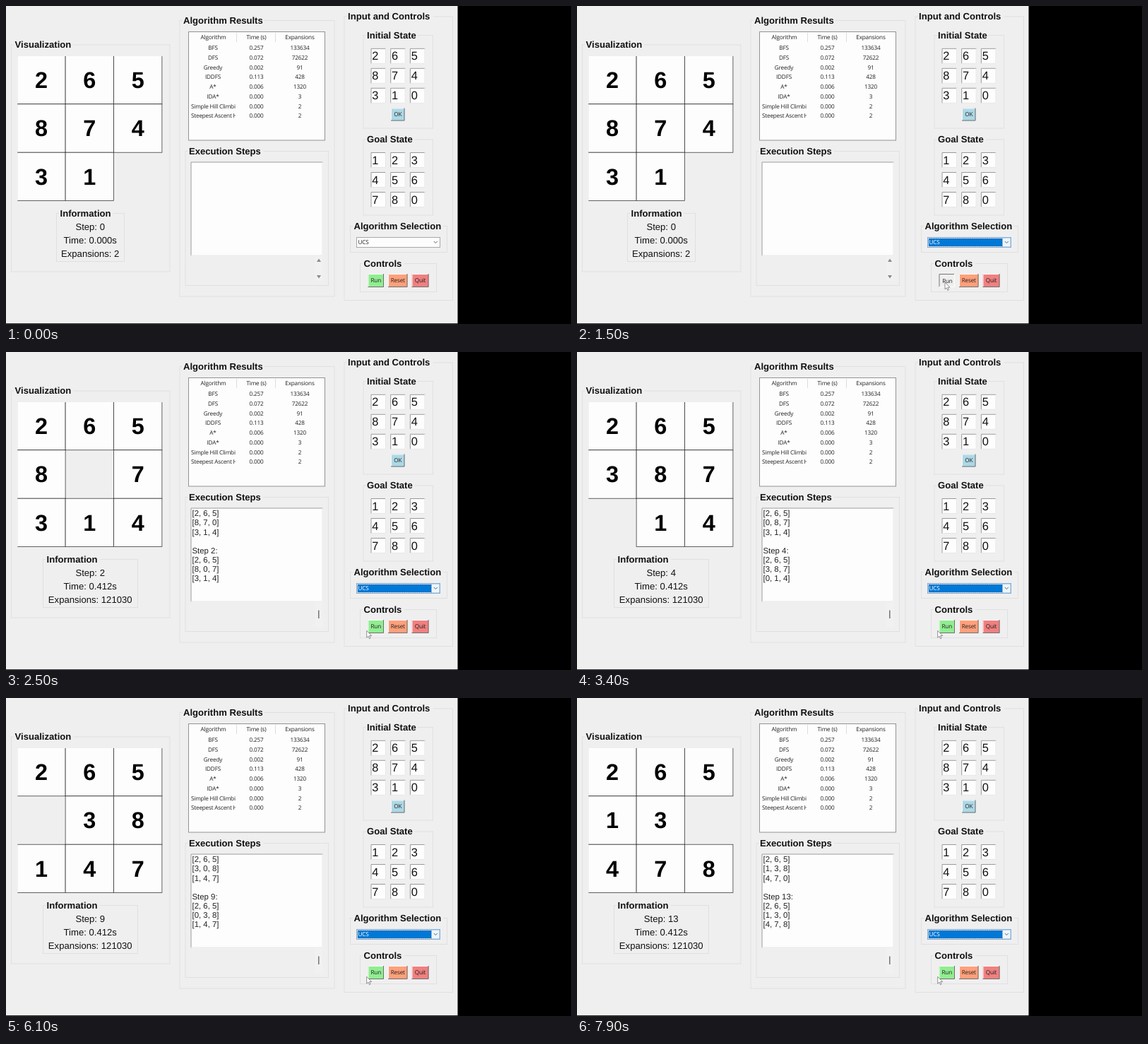
Recreate the animation shown at these times as an HTML page. Size 800 by 450 pixels, loop 8 s.

```html
<!DOCTYPE html>
<html lang="en">
<head>
<meta charset="utf-8">
<title>Puzzle solver</title>
<style>
html, body { margin: 0; width: 100%; height: 100%; overflow: hidden; background: #000; }
svg { display: block; width: 800px; height: 450px; }
text { font-family: "Liberation Sans", Arial, sans-serif; font-size: 13.1px; fill: #111; white-space: pre; text-rendering: geometricPrecision; }
.head { font-weight: bold; }
.tile { font-weight: bold; font-size: 32.4px; fill: #000; }
.entry { font-size: 16.4px; }
.log { font-size: 11.4px; fill: #222; }
.ui { font-family: "Open Sans", "Noto Sans", sans-serif; font-size: 8.2px; letter-spacing: -.2px; fill: #222; }
</style>
</head>
<body>
<svg viewBox="0 0 800 450">
  <defs>
    <clipPath id="board"><rect x="16.3" y="71" width="206" height="206"/></clipPath>
    <clipPath id="names"><rect x="259" y="50" width="66" height="139"/></clipPath>
  </defs>
  <g id="fixed"></g>
  <g id="live"></g>
</svg>
<script>
const LOOP = 8000, FOCUS = 1000, PRESS = 1400, FIRST = 1550, STEP = 510;
const BG = '#f0eff0';
const start = [2, 6, 5, 8, 7, 4, 3, 1, 0];
const goal = [1, 2, 3, 4, 5, 6, 7, 8, 0];
const blankCycle = [8, 5, 4, 3, 6, 7];

const rect = (x, y, w, h, fill, stroke = 'none') =>
  `<rect x="${x}" y="${y}" width="${w}" height="${h}" fill="${fill}" stroke="${stroke}"/>`;
const path = (d, stroke, fill = 'none', width = 1) =>
  `<path d="${d}" stroke="${stroke}" fill="${fill}" stroke-width="${width}"/>`;
const text = (x, y, s, cls = '', anchor = 'start', extra = '') =>
  `<text x="${x}" y="${y}" class="${cls}" text-anchor="${anchor}" ${extra}>${s}</text>`;
const mid = (x, y, s, cls) => text(x, y, s, cls, 'middle');

function group(x, y, x2, y2, title, labelWidth) {
  return rect(x + .5, y + .5, x2 - x, y2 - y, 'none', '#e0dfe1') +
    rect(x + 4, y - 2, labelWidth + 4, 5, BG) + text(x + 5.5, y + 4.6, title, 'head');
}

function bevel(x, y, w, h, fill, light, dark) {
  return rect(x, y, w, h, fill) +
    path(`M${x + .5} ${y + h}V${y + .5}H${x + w}`, light) +
    path(`M${x} ${y + h - .5}H${x + w - .5}V${y}`, dark);
}

function button(x, y, w, h, color, label, down = false) {
  const shift = down ? .7 : 0;
  return bevel(x, y, w, h, down ? BG : color, down ? '#777' : '#f8f8f8', down ? '#fff' : '#707070') +
    mid(x + w / 2 + shift, y + h / 2 + 2.8 + shift, label, 'ui');
}

function entries(y, values) {
  return values.map((v, i) => {
    const ex = 516.5 + i % 3 * 27.7, ey = y + Math.floor(i / 3) * 28;
    return bevel(ex, ey, 21.5, 22, '#fdfdfd', '#999', '#e6e6e6') + text(ex + 1.8, ey + 16.6, v, 'entry');
  }).join('');
}

function table() {
  const rows = [
    ['BFS', '0.257', 133634], ['DFS', '0.072', 72622], ['Greedy', '0.002', 91],
    ['IDDFS', '0.113', 428], ['A*', '0.006', 1320], ['IDA*', '0.000', 3],
    ['Simple Hill Climbing', '0.000', 2], ['Steepest Ascent Hill', '0.000', 2]
  ];
  let s = rect(258.5, 36.5, 193, 153.5, '#fdfdfd', '#8f9398') +
    path('M326.5 38V51M381.5 38V51', '#dcdcdc') +
    mid(293.5, 47.2, 'Algorithm', 'ui') + mid(354.5, 47.2, 'Time (s)', 'ui') + mid(416, 47.2, 'Expansions', 'ui');
  rows.forEach(([name, time, count], i) => {
    const y = 62.2 + i * 13.75;
    s += i < 6 ? mid(293, y, name, 'ui')
      : `<g clip-path="url(#names)">${text(262, y, name, 'ui')}</g>`;
    s += mid(354.5, y, time, 'ui') + mid(416, y, count, 'ui');
  });
  return s;
}

function boardAt(step) {
  const b = [...start];
  for (let i = 1; i <= step; i++) {
    const from = blankCycle[(i - 1) % 6], to = blankCycle[i % 6];
    [b[from], b[to]] = [b[to], 0];
  }
  return b;
}

function tiles(board) {
  const s = board.map((v, i) => {
    if (!v) return '';
    const x = 15.7 + i % 3 * 68.4, y = 70.4 + Math.floor(i / 3) * 68.4;
    return `<rect x="${x}" y="${y}" width="68.4" height="68.4" fill="#fdfdfd" stroke="#222" stroke-width=".7"/>` +
      mid(x + 34.2, y + 45.3, v, 'tile');
  }).join('');
  return `<g clip-path="url(#board)">${s}</g>`;
}

function info(step) {
  const [x, x2] = step ? [52, 186] : [71, 167];
  return group(x, 293, x2, 361, 'Information', 73) +
    mid(119.2, 316.5, `Step: ${step}`) +
    mid(119.2, 335.8, `Time: ${step ? '0.412' : '0.000'}s`) +
    mid(119.2, 355, `Expansions: ${step ? 121030 : 2}`);
}

function log(step) {
  const lines = [];
  for (let i = 1; i <= step; i++) {
    const b = boardAt(i);
    lines.push(`Step ${i}:`, ...[0, 3, 6].map(r => `[${b.slice(r, r + 3).join(', ')}]`), '');
  }
  lines.push('');
  return lines.slice(-10).map((s, i) => text(263.5, 232.4 + i * 13.05, s, 'log')).join('');
}

function scrollbar(step) {
  return step < 2
    ? path('M440 362L443 357.5L446 362ZM440 381L443 385.5L446 381Z', 'none', '#8b8b8b')
    : rect(442.2, 365.5, 1.2, 11.5, '#555');
}

function combo(focus) {
  return rect(496.5, 327.5, 118, 14, '#fdfdfd', focus ? '#7aa9d0' : '#a8a8a8') +
    (focus
      ? rect(498, 329, 104, 11, '#0078d7') +
        '<rect x="498" y="329" width="104" height="11" fill="none" stroke="#2b4a66" stroke-width=".8" stroke-dasharray=".8 .8"/>' +
        rect(602.5, 328, 11.5, 13, '#edf5fb', '#8fbbdf')
      : '') +
    text(498.5, 337.2, 'UCS', 'ui', 'start', focus ? 'style="fill:#fff"' : '') +
    path('M605.8 333L608.3 335.5L610.8 333', '#555', 'none', .9);
}

const ease = p => (p = Math.min(1, Math.max(0, p)), p * p * (3 - 2 * p));

function cursor(t) {
  if (t < FOCUS) return '';
  const a = ease((t - FOCUS) / 300), b = ease((t - 1900) / 300);
  const x = 540 - 19 * a - 10.3 * b, y = 345 + 46 * a + 3.3 * b;
  return `<g transform="translate(${x} ${y})">` +
    path('M0 0V9.8L2.3 7.8L3.9 11.4L5.4 10.7L3.9 7.2H7Z', '#666', '#fff', .7) + '</g>';
}

function draw(t) {
  const step = t < FIRST ? 0 : 1 + Math.floor((t - FIRST) / STEP);
  live.innerHTML = tiles(boardAt(step)) + info(step) + log(step) + scrollbar(step) +
    combo(t >= FOCUS) +
    button(512.5, 379, 22.5, 19, '#90ee90', 'Run', t >= PRESS && t < FIRST) + cursor(t);
}

const fixed = document.getElementById('fixed'), live = document.getElementById('live');
fixed.innerHTML = rect(0, 0, 639.5, 449, BG) + rect(0, 449, 639.5, 1, '#2a2a2a') +
  group(7, 54.5, 231.5, 375.5, 'Visualization', 80) +
  group(245.5, 20, 464.5, 410.5, 'Algorithm Results', 112) + table() +
  group(253.5, 205, 456, 395, 'Execution Steps', 103) +
  bevel(261.5, 220.5, 187, 133, '#fdfdfd', '#999', '#e8e8e8') +
  rect(437.5, 354, 11, 35, '#f2f1f2') +
  group(478.5, 14.5, 632, 416, 'Input and Controls', 118) +
  group(505.5, 41, 604, 172.5, 'Initial State', 69) + entries(59.8, start) +
  button(545, 144.5, 19.5, 18, '#add8e6', 'OK') +
  group(505.5, 188.5, 604, 295.5, 'Goal State', 65) + entries(207, goal) +
  group(487, 311, 624, 348, 'Algorithm Selection', 124) +
  group(501, 364, 609, 404, 'Controls', 55) +
  button(541, 379, 27.5, 19, '#ffa07a', 'Reset') +
  button(574.5, 379, 24, 19, '#f08080', 'Quit');

const begin = performance.now();
(function tick() {
  draw((performance.now() - begin) % LOOP);
  requestAnimationFrame(tick);
})();
</script>
</body>
</html>
```
